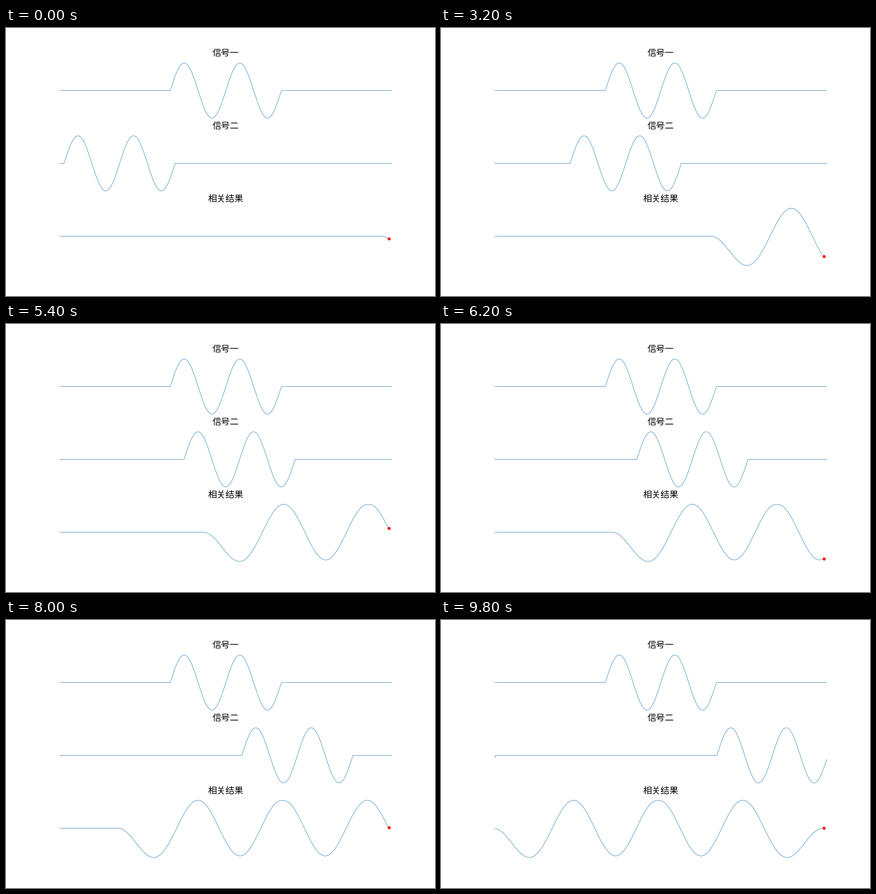
A matplotlib script that plays this animation: 800 px wide and 500 px high, repeating every 10000 ms.

```python
import numpy as np
import matplotlib.pyplot as plt
from matplotlib.animation import FuncAnimation

FRAMES, INTERVAL = 50, 200
L = 250               # samples in the burst
PAD = L - 1           # zeros on either side of it
N = L + 2 * PAD       # samples per signal
LAGS = 2 * L - 1      # points in the correlation trace
STEP = 10             # samples moved per frame

plt.rcParams["font.family"] = ["Noto Sans CJK JP"]

signal = np.zeros(N)
signal[:L] = np.sin(4 * np.pi * np.arange(L) / L)


def correlation(lag):
    """Correlation of the two bursts, divided by their overlap."""
    overlap = np.clip(L - np.abs(lag - L), 0, None)
    theta = overlap * 4 * np.pi / L
    return np.cos(theta) - np.sinc(theta / np.pi)


fig, axes = plt.subplots(3, 1, figsize=(8, 5), dpi=100)
for ax, title, right in zip(axes, ("信号一", "信号二", "相关结果"),
                            (N, N, LAGS * 1.01)):
    ax.set_title(title, fontsize=12, fontweight="light")
    ax.set_xlim(0, right)
    ax.set_ylim(-1.1, 1.1)
    ax.axis("off")

axes[0].plot(np.roll(signal, PAD), lw=0.5)
moving, = axes[1].plot(signal, lw=0.5)
x = np.arange(LAGS)
trace, = axes[2].plot(x, np.zeros(LAGS), lw=0.5)
dot, = axes[2].plot([LAGS], [0], "r.")


def update(i):
    lag = STEP * (i + 1)
    moving.set_ydata(np.roll(signal, lag))
    trace.set_ydata(correlation(lag - x[::-1]))
    dot.set_ydata([correlation(lag)])
    return moving, trace, dot


anim = FuncAnimation(fig, update, frames=FRAMES, interval=INTERVAL,
                     repeat=True, repeat_delay=0)
plt.show()
```
